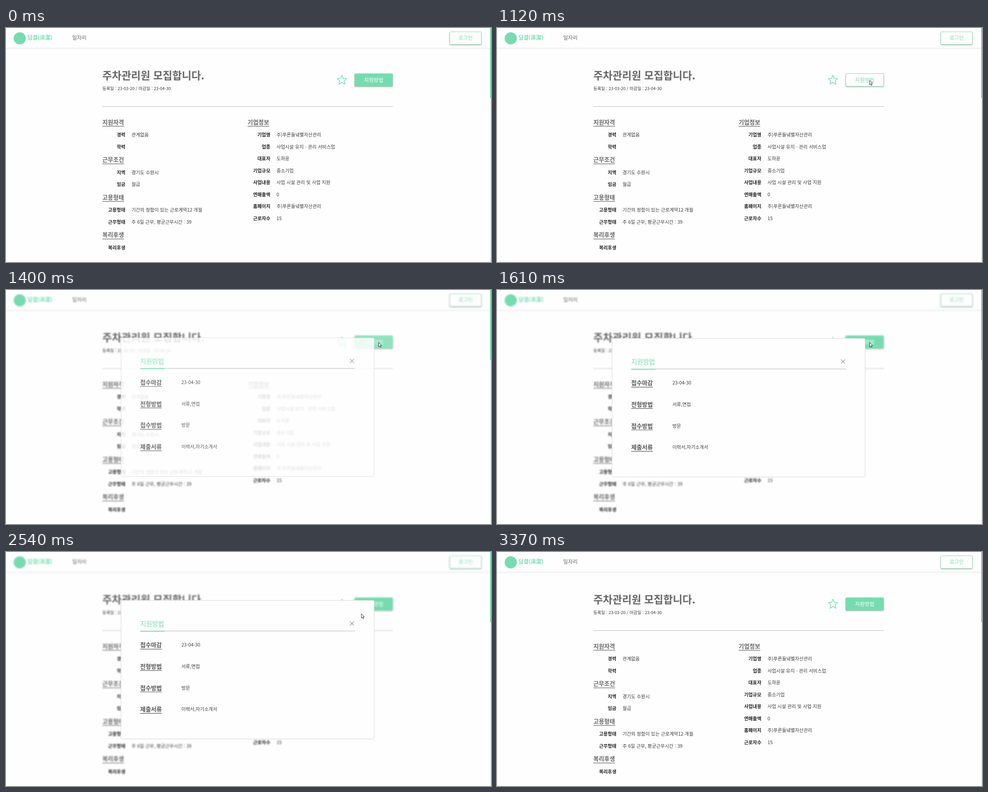
These frames come from a looping animation (1077x520 px, 4230 ms). An HTML page:

```html
<!DOCTYPE html>
<html lang="ko">
<head>
<meta charset="utf-8">
<title>채용 공고</title>
<style>
  html, body { margin: 0; width: 100%; height: 100%; overflow: hidden; background: #fefefe; }
  svg { display: block; width: 100%; height: 100%; }
  text { font-family: "Noto Sans CJK KR", "Noto Sans CJK", sans-serif; white-space: pre; }
  .raised { filter: drop-shadow(0 1.7px 1.3px rgba(0, 0, 0, .36)); }
  .bar { filter: drop-shadow(0 1.5px 1.5px rgba(0, 0, 0, .12)); }
</style>
</head>
<body>
<svg id="stage" viewBox="0 0 1077 520"></svg>
<script>
const LOOP = 4230;
const GREEN = "#76dcb0", PAPER = "#fefefe";

// Text is placed by the vertical centre of its line.
const text = (x, cy, size, str, { fill = "#3a3a3a", weight = 400, anchor = "start", id = "" } = {}) =>
  `<text x="${x}" y="${cy + size * .37}" font-size="${size}" fill="${fill}" font-weight="${weight}"
    text-anchor="${anchor}" ${id && `id="${id}"`}>${str}</text>`;
const rule = (x1, x2, y, color, width = 1) =>
  `<path d="M${x1} ${y}H${x2}" stroke="${color}" stroke-width="${width}"/>`;
const heading = (x, cy, str, fill = "#666") =>
  text(x, cy, 13, str, { fill, weight: 700 }) + rule(x, x + 48, cy + 9.3, fill, 1.2);
const row = (x, cy, label, value = "") =>
  text(x, cy, 10.4, label, { fill: "#222", weight: 700, anchor: "end" }) +
  text(x + 13.7, cy, 10.4, value);
const button = (x, y, w, label, size, id) => `
  <rect id="${id}" class="raised" x="${x + .5}" y="${y + .5}" width="${w - 1}" height="28" rx="2"
    fill="${PAPER}" stroke="${GREEN}" stroke-opacity=".8"/>` +
  text(x + w / 2, y + 14.3, size, label, { fill: GREEN, anchor: "middle", id: id + "Label" });

const star = Array.from({ length: 10 }, (_, i) => {
  const a = i * Math.PI / 5 - Math.PI / 2, r = i % 2 ? 5 : 11.2;
  return `${746 + r * Math.cos(a)},${116 + r * Math.sin(a)}`;
}).join(" ");

const company = "주)푸른들녘별자산관리";
const companyRows = [
  ["기업명", company], ["업종", "사업시설 유지ㆍ관리 서비스업"], ["대표자", "도하윤"],
  ["기업규모", "중소기업"], ["사업내용", "사업 시설 관리 및 사업 지원"],
  ["연매출액", "0"], ["홈페이지", company], ["근로자수", "15"],
];
const applyRows = [
  ["접수마감", "23-04-30"], ["전형방법", "서류,면접"], ["접수방법", "방문"], ["제출서류", "이력서,자기소개서"],
];

const page = `
  <rect class="bar" x="-9" y="-9" width="1095" height="53" fill="${PAPER}"/>
  <circle cx="30.5" cy="23" r="13.5" fill="${GREEN}"/>
  ${text(48, 22, 12, "담결(淡潔)", { fill: GREEN, weight: 700 })}
  ${text(147, 21.5, 11.6, "일자리", { fill: "#666" })}
  ${button(985, 8, 71, "로그인", 11.3, "login")}
  ${text(214, 105.5, 23.1, "주차관리원 모집합니다.", { fill: "#666", weight: 700 })}
  ${text(214, 134.5, 9.4, "등록일 : 23-03-20 / 마감일 : 23-04-30")}
  <polygon points="${star}" fill="none" stroke="${GREEN}" stroke-width="1.5" stroke-linejoin="round"/>
  ${button(774, 101, 85, "지원방법", 11.7, "apply")}
  ${rule(214, 859, 174.5, "#bbb")}
  ${heading(214, 209, "지원자격")}
  ${row(265, 237.5, "경력", "관계없음")}
  ${row(265, 264, "학력")}
  ${heading(214, 292.5, "근무조건")}
  ${row(265, 321, "지역", "경기도 수원시")}
  ${row(265, 347.5, "임금", "월급")}
  ${heading(214, 376, "고용형태")}
  ${row(265, 404.5, "고용형태", "기간의 정함이 있는 근로계약12 개월")}
  ${row(265, 431, "근무형태", "주 6일 근무, 평균근무시간 : 39")}
  ${heading(214, 459.5, "복리후생")}
  ${row(265, 488, "복리후생")}
  ${heading(536.5, 209, "기업정보")}
  ${companyRows.map(([k, v], i) => row(587, 237.5 + 26.5 * i, k, v)).join("")}`;

const modal = `
  <rect x="255.5" y="107.5" width="562" height="308" rx="3" fill="${PAPER}" stroke="#d9d9d9"/>
  ${text(298, 160, 14.4, "지원방법", { fill: GREEN, weight: 500 })}
  ${rule(298, 775, 175.5, "#b5b5b5")}
  ${rule(298, 352, 176, GREEN, 2)}
  <path d="M764 154.5l8.6 9m0-9l-8.6 9" stroke="#555"/>
  ${applyRows.map(([k, v], i) =>
    heading(298, 206.5 + 47.6 * i, k, "#555") + text(389.5, 206.5 + 47.6 * i, 10.4, v)).join("")}`;

stage.innerHTML = `
  <rect width="1077" height="520" fill="${PAPER}"/>
  <g id="pageLayer">${page}</g>
  <rect x="1075" width="2" height="520" fill="#e6f3ed"/>
  <rect x="1075" y="-2" width="2" height="158" rx="1" fill="${GREEN}"/>
  <g id="modalLayer">${modal}</g>
  <circle id="click" cx="762" cy="161" r="6.5" fill="#ffee3c" opacity=".8"/>
  <g id="cursor" fill="#fff" stroke="#222" stroke-width=".9" stroke-linejoin="round">
    <path id="arrow" d="M.4.4V10.2L2.6 8.2L4.1 11.7L5.7 11L4.2 7.6H7.1Z"/>
    <path id="hand" d="M-1.1.9Q0-.5 1.1.9V5L4.8 5.7Q6 6.1 6 7.4V9.4L4.8 13H-1.2L-4 8.6Q-4.1 7-2.7 7.3L-1.1 9Z"/>
  </g>`;

const clamp = v => Math.max(0, Math.min(1, v));
const span = (t, a, b) => clamp((t - a) / (b - a));
const easeOut = p => 1 - (1 - p) ** 2;
const mix = (a, b, p) => a + (b - a) * p;
const blend = (a, b, p) => `rgb(${a.map((v, i) => mix(v, b[i], p))})`;
const show = (el, on) => el.setAttribute("visibility", on ? "visible" : "hidden");
const greenRGB = [118, 220, 176], paperRGB = [254, 254, 254];

// start, end, number of poses, from, to, easing
const linear = p => p;
const moves = [
  [120, 600, 8, [1068, 509], [855, 137], easeOut],
  [670, 740, 2, [847, 131], [840, 127], linear],
  [790, 1050, 5, [838, 125], [827, 116], linear],
  [2130, 2610, 8, [823, 118], [775, 144], linear],
  [2680, 2870, 4, [771, 150], [763, 162], linear],
  [3010, 3010, 2, [763, 160], [763, 160], linear],
  [3240, 3310, 2, [850, 165], [984, 172], linear],
];

function cursorAt(t) {
  const [start, end, poses, from, to, ease] = moves.findLast(m => m[0] <= t) || moves[0];
  const last = poses - 1;
  const p = end > start ? Math.floor(span(t, start, end) * last + 1e-6) / last : 1;
  return from.map((v, i) => mix(v, to[i], ease(p)));
}

function draw(t) {
  const hover = span(t, 740, 930) * (1 - span(t, 1190, 1450));
  apply.setAttribute("fill", blend(greenRGB, paperRGB, hover));
  applyLabel.setAttribute("fill", blend(paperRGB, greenRGB, hover));

  const open = t >= 1190 && t < 3010 ? easeOut(span(t, 1150, 1570)) : 0;
  pageLayer.style.filter = open ? `blur(${1.7 * open}px)` : "none";
  show(modalLayer, open > 0);
  modalLayer.setAttribute("opacity", open);
  modalLayer.setAttribute("transform", `translate(0 ${-8 * (1 - open)})`);

  const pointing = (t >= 670 && t < 1120) || (t >= 2800 && t < 3010);
  const visible = t >= 120 && t < 3370;
  show(arrow, visible && !pointing);
  show(hand, visible && pointing);
  show(click, t >= 2870 && t < 3010);
  cursor.setAttribute("transform", `translate(${cursorAt(t)})`);
}

const { apply, applyLabel, pageLayer, modalLayer, click, cursor, arrow, hand } =
  Object.fromEntries([...stage.querySelectorAll("[id]")].map(el => [el.id, el]));
const begin = performance.now();
(function tick() {
  draw((performance.now() - begin) % LOOP);
  requestAnimationFrame(tick);
})();
</script>
</body>
</html>
```
